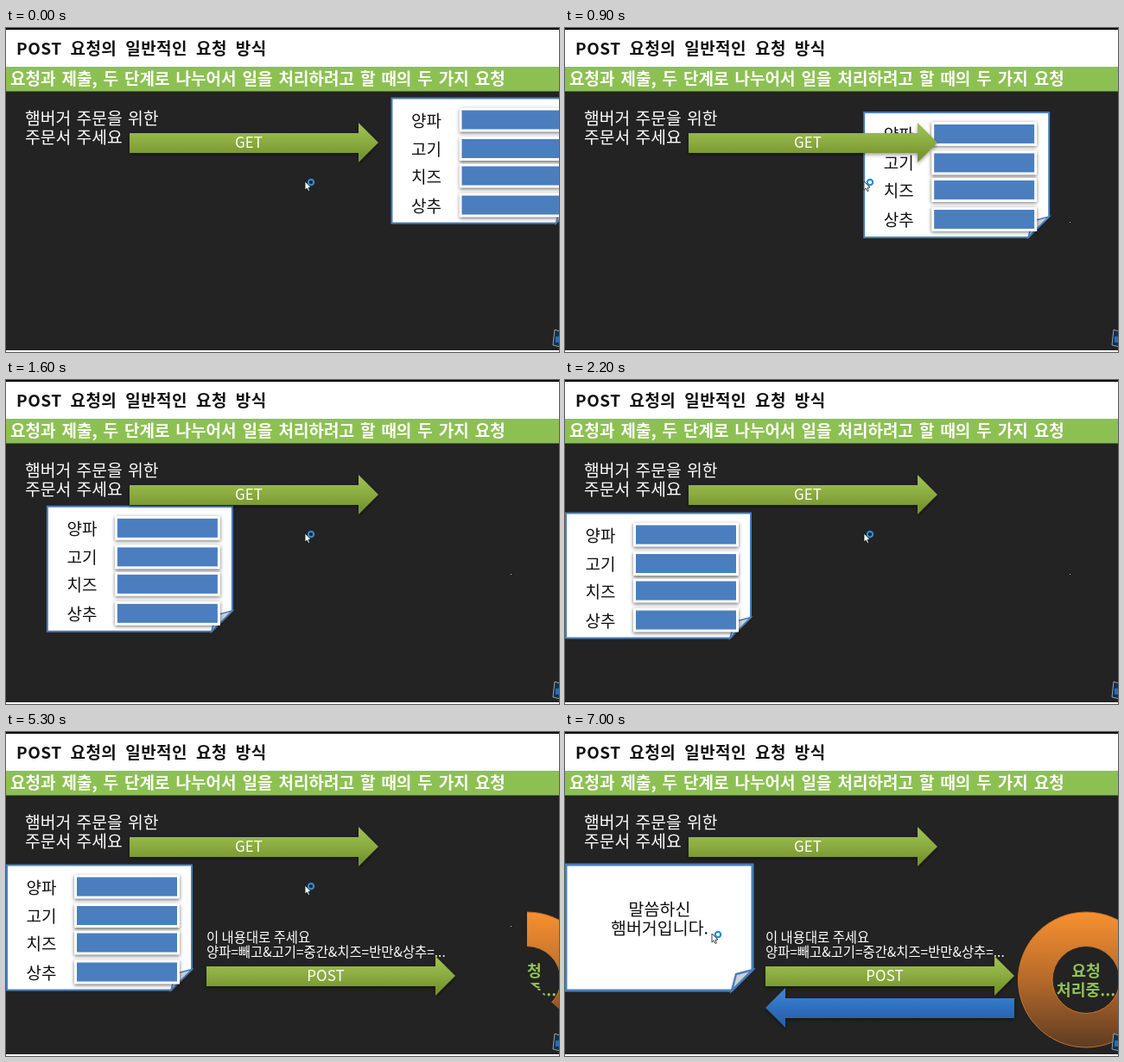
An HTML page with a canvas that plays this animation: 640x376 px, repeating every 7700 ms.

```html
<!DOCTYPE html>
<html lang="ko">
<head>
<meta charset="utf-8">
<title>POST 요청</title>
<style>
  html, body { margin: 0; width: 100%; height: 100%; overflow: hidden; background: #222; }
  canvas { display: block; }
</style>
</head>
<body>
<canvas id="stage" width="640" height="376"></canvas>
<script>
const ctx = document.getElementById('stage').getContext('2d');
const LOOP = 7700, STEP = 100;
const FONT = '"Noto Sans CJK KR", "Noto Sans CJK", "Noto Sans CJK JP", sans-serif';

const progress = (t, start, length) => Math.min(1, Math.max(0, (t - start) / length));
const ease = u => (1 - Math.cos(Math.PI * u)) / 2;
const mix = (a, b, u) => a + (b - a) * u;

function box(x, y, w, h, color) {
  ctx.fillStyle = color;
  ctx.fillRect(x, y, w, h);
}

// y is the middle of the line
function text(str, x, y, size, color, { align = 'left', weight = 400, letter = 0, word = 0 } = {}) {
  ctx.font = `${weight} ${size}px ${FONT}`;
  ctx.letterSpacing = letter + 'px';
  ctx.wordSpacing = word + 'px';
  ctx.textAlign = align;
  ctx.fillStyle = color;
  ctx.fillText(str, x, y + size * 0.37);
}

function polygon(points, fill, stroke, width = 1) {
  ctx.beginPath();
  points.forEach(([x, y]) => ctx.lineTo(x, y));
  ctx.closePath();
  ctx.fillStyle = fill;
  ctx.fill();
  if (stroke) {
    ctx.strokeStyle = stroke;
    ctx.lineWidth = width;
    ctx.stroke();
  }
}

function gradient(top, bottom, ...colors) {
  const g = ctx.createLinearGradient(0, top, 0, bottom);
  colors.forEach((c, i) => g.addColorStop(i / (colors.length - 1), c));
  return g;
}

function shadow(color, blur, dy) {
  ctx.shadowColor = color;
  ctx.shadowBlur = blur;
  ctx.shadowOffsetY = dy;
}

function layer(draw, x = 0, y = 0) {
  ctx.save();
  ctx.translate(x, y);
  draw();
  ctx.restore();
}

function clipped(x, y, w, h, draw) {
  layer(() => {
    ctx.beginPath();
    ctx.rect(x, y, w, h);
    ctx.clip();
    draw();
  });
}

function arrow(x, y, dir, colors) {
  layer(() => {
    ctx.scale(dir, 1);
    shadow('rgba(0,0,0,.4)', 4, 2);
    polygon([[0, 12], [265, 12], [265, 0], [288, 23], [265, 46], [265, 35], [0, 35]],
      gradient(8, 38, ...colors));
  }, x, y);
}

const GREEN = ['#9abb4c', '#8aab40', '#76962f'];
const BLUE = ['#3a80cf', '#2f6fbf', '#2a62ab'];

function sheet(w, h, border) {
  polygon([[1, 1], [w - 1, 1], [w - 1, h - 25], [w - 25, h - 1], [1, h - 1]], '#fff', '#4a7ebb', border);
  polygon([[w - 25, h - 1], [w - 20, h - 20], [w - 1, h - 25]], '#ccd0d6', '#4a7ebb', border * 0.8);
}

function orderForm() {
  sheet(216, 147, 2);
  [['양파', 27], ['고기', 60.5], ['치즈', 92], ['상추', 126]].forEach(([label, y]) => {
    text(label, 41, y, 19, '#111', { align: 'center' });
    layer(() => {
      shadow('rgba(0,0,0,.55)', 4, 1.5);
      box(79, y - 15, 122, 28, '#fff');
    });
    box(82, y - 12, 116, 22, '#4a7ebf');
  });
}

function response() {
  sheet(218, 148, 3);
  text('말씀하신', 109.5, 52.5, 19.5, '#111', { align: 'center' });
  text('햄버거입니다.', 109.5, 74.5, 19.5, '#111', { align: 'center' });
}

// Ring revealed clockwise from the top
function ring(u) {
  const top = -Math.PI / 2, full = 2 * Math.PI;
  const label = { align: 'center', weight: 700 };
  layer(() => {
    ctx.beginPath();
    ctx.moveTo(0, 0);
    ctx.arc(0, 0, 100, top, top + full * u);
    ctx.clip();
    ctx.beginPath();
    ctx.arc(0, 0, 78.5, 0, full);
    ctx.moveTo(39, 0);
    ctx.arc(0, 0, 39, 0, full, true);
    ctx.fillStyle = gradient(-78, 78, '#f79030', '#b66a2a', '#5f3c22');
    ctx.fill();
    ctx.strokeStyle = '#c87428';
    ctx.lineWidth = 1;
    ctx.stroke();
    text('요청', 0, -10, 18.3, '#92c353', label);
    text('처리중...', 0, 11.5, 18.3, '#92c353', label);
  }, 603, 287.5);
}

function cursor(x, y) {
  layer(() => {
    polygon([[0, 0], [0, 10], [2.2, 8], [4, 11.5], [5.5, 10.7], [4, 7.3], [7, 7]], '#fff', '#111', 0.8);
    ctx.beginPath();
    ctx.arc(7, 1, 3.2, 0, 7);
    ctx.strokeStyle = '#2a8bd4';
    ctx.lineWidth = 2.2;
    ctx.stroke();
  }, x, y);
}

function background() {
  box(0, 0, 640, 376, '#222322');
  box(0, 0, 640, 3, '#000');
  box(0, 2, 640, 43, '#fff');
  box(0, 45, 640, 28.5, '#8cc152');
  box(0, 374, 640, 2, '#fff');
  text('POST 요청의 일반적인 요청 방식', 12, 23.5, 19, '#111', { weight: 900, letter: 0.5, word: 5 });
  text('요청과 제출, 두 단계로 나누어서 일을 처리하려고 할 때의 두 가지 요청', 5, 59, 19, '#fff',
    { weight: 700, word: 2.7 });
  text('햄버거 주문을 위한', 22, 104.5, 19.3, '#fff', { word: 2 });
  text('주문서 주세요', 22, 127, 19.3, '#fff', { word: 2 });
  box(584, 225, 1, 1, '#ccc');
}

function post() {
  text('이 내용대로 주세요', 232, 238, 15.4, '#fff');
  text('양파=빼고&고기=중간&치즈=반만&상추=...', 232, 255, 15.4, '#fff');
  arrow(232, 260, 1, GREEN);
  text('POST', 370, 283, 17, '#fff', { align: 'center' });
}

function render(t) {
  background();

  const formMove = ease(progress(t, 436, 1474));
  layer(orderForm, mix(445.5, 0, formMove), mix(80.5, 153.5, formMove));
  arrow(143, 110, 1, GREEN);
  text('GET', 281, 133, 17, '#fff', { align: 'center' });

  const postShown = progress(t, 4600, 500);
  clipped(228, 225, 296 * postShown, 90, post);

  const ringShown = progress(t, 4600, 1900);
  if (ringShown) ring(ringShown);

  const replyShown = progress(t, 6250, 500);
  clipped(524 - 296 * replyShown, 290, 296 * replyShown, 60, () => arrow(520, 297, -1, BLUE));

  ctx.globalAlpha = progress(t, 6400, 400);
  layer(response, 0, 153);
  ctx.globalAlpha = 1;

  polygon([[635, 350], [641, 352], [641, 370], [633, 368]], '#14304f', '#8fa3b5');
  box(636, 358, 4, 7, '#2371b5');

  const cursorMove = ease(progress(t, 6000, 500));
  cursor(mix(346, 170, cursorMove), mix(178, 234, cursorMove));
}

function tick() {
  const t = performance.now() % LOOP;
  render(Math.floor(t / STEP) * STEP);
  requestAnimationFrame(tick);
}
tick();
</script>
</body>
</html>
```
